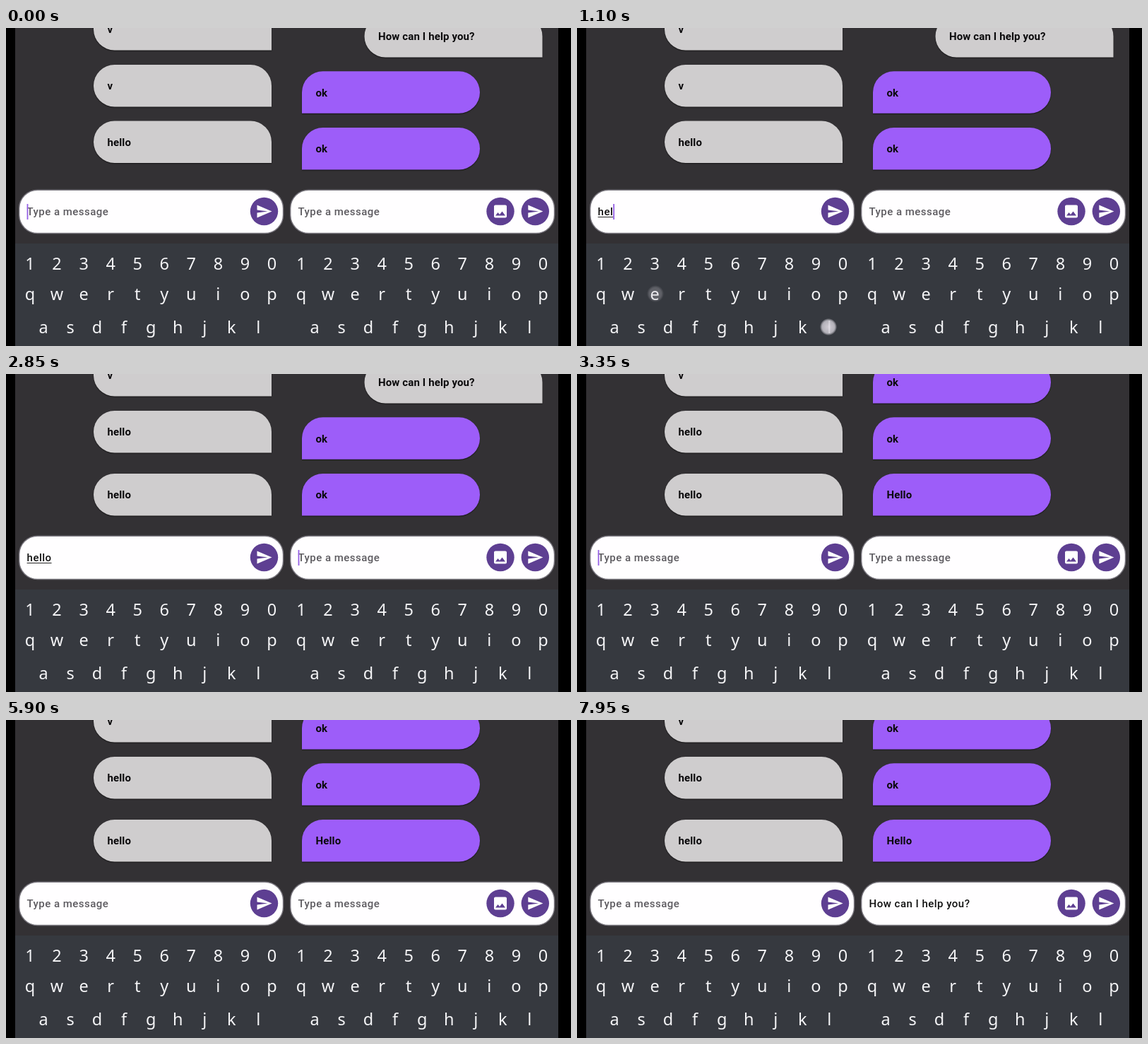
Write an HTML page with a canvas that moves like this. It is 800 by 450 pixels and loops after 8000 ms.

```html
<!DOCTYPE html>
<html lang="en">
<head>
<meta charset="utf-8">
<title>Two-phone chat</title>
<style>
  html, body { margin: 0; width: 100%; height: 100%; overflow: hidden; background: #000; }
  canvas { display: block; width: 800px; height: 450px; }
</style>
</head>
<body>
<canvas id="stage" width="800" height="450"></canvas>
<script>
const ctx = document.getElementById('stage').getContext('2d');
const LOOP = 8000, PHONE_GAP = 384;
const GREY = '#cfcdce', PURPLE = '#9d5df9', BUTTON = '#5e3f92', CURSOR = '#9560e6';
const FIELD_FONT = '500 15px Roboto, sans-serif';
const BUBBLE_FONT = '600 15px Roboto, sans-serif';
const KEY_FONT = '23.5px "Noto Sans", sans-serif';

const SEND_ICON = new Path2D('M2 21L23 12 2 3v7l15 2-15 2z');
const IMAGE_ICON = new Path2D('M21 19V5c0-1.1-.9-2-2-2H5c-1.1 0-2 .9-2 2v14c0 1.1.9 2 2 2h14c1.1 0 2-.9 2-2z' +
  'M8.5 13.5l2.5 3.01L14.5 12l4.5 6H5l3.5-4.5z');

// Each letter is committed when the finger lifts.
const TAPS = [
  { key: 'h', down: 60, up: 200, x: 233, y: 427 },
  { key: 'e', down: 550, up: 800, x: 111, y: 376 },
  { key: 'l', down: 920, up: 1000, x: 356, y: 423 },
  { key: 'l', down: 1100, up: 1200, x: 356, y: 423 },
  { key: 'o', down: 1260, up: 1350, x: 340, y: 377 }
];
const LAST_KEY = 1350, SENT = 2650, CLEARED = 3000, RECEIVED = 3150;
const MENU_OPEN = 6700, PASTED = 7350, TAP_FADE = 500;

function text(string, x, y, font, color, spacing = 0, align = 'left') {
  ctx.font = font;
  ctx.letterSpacing = spacing + 'px';
  ctx.textAlign = align;
  ctx.fillStyle = color;
  ctx.fillText(string, x, y);
  return ctx.measureText(string).width;
}

function roundRect(x, y, w, h, radii) {
  ctx.beginPath();
  ctx.roundRect(x, y, w, h, radii);
}

function bubble(x, y, message, incoming) {
  ctx.save();
  ctx.shadowColor = 'rgba(0,0,0,.6)';
  ctx.shadowOffsetY = 1;
  ctx.shadowBlur = 1.5;
  roundRect(x, y, 252, 59.5, incoming ? [30, 30, 30, 0] : [30, 30, 0, 30]);
  ctx.fillStyle = incoming ? PURPLE : GREY;
  ctx.fill();
  ctx.restore();
  text(message, x + 19.5, y + 35.3, BUBBLE_FONT, '#0b0a0c', 0.12);
}

function button(x, icon) {
  ctx.beginPath();
  ctx.arc(x, 259.5, 19.7, 0, Math.PI * 2);
  ctx.fillStyle = BUTTON;
  ctx.fill();
  ctx.save();
  ctx.translate(x - 12, 247.5);
  ctx.fillStyle = '#fff';
  ctx.fill(icon, 'evenodd');
  ctx.restore();
}

function field(left, value, composing, cursorOn) {
  roundRect(left + 0.7, 229.2, 373.8, 61.3, 26);
  ctx.fillStyle = '#fffeff';
  ctx.fill();
  ctx.strokeStyle = '#79767e';
  ctx.lineWidth = 1.4;
  ctx.stroke();
  const x = left + 11.6;
  const width = text(value || 'Type a message', x, 265, FIELD_FONT, value ? '#111' : '#5d5b60', 0.47);
  if (value && composing) {
    ctx.fillStyle = '#222';
    ctx.fillRect(x, 267, width, 1);
  }
  if (cursorOn) {
    ctx.fillStyle = CURSOR;
    ctx.fillRect(x + (value ? width : 0), 249, 1.8, 22);
  }
}

function keyboard(offset) {
  const row = (keys, x, baseline) => [...keys].forEach((key, i) =>
    text(key, offset + x + i * 38.05, baseline, KEY_FONT, '#f4f4f6', 0, 'center'));
  row('1234567890', 34, 342);
  row('qwertyuiop', 34, 384.5);
  row('asdfghjkl', 53, 432);
}

function tapDot({ down, up, x, y }, t) {
  const alpha = t < down ? 0 : Math.min(1, Math.max(0, 1 - (t - up) / TAP_FADE));
  if (!alpha) return;
  const glow = ctx.createRadialGradient(x, y, 0, x, y, 12);
  glow.addColorStop(0, `rgba(225,220,228,${0.75 * alpha})`);
  glow.addColorStop(0.72, `rgba(205,202,210,${0.65 * alpha})`);
  glow.addColorStop(1, 'rgba(205,202,210,0)');
  ctx.fillStyle = glow;
  ctx.fillRect(x - 12, y - 12, 24, 24);
}

function pasteMenu(alpha) {
  ctx.save();
  ctx.globalAlpha = alpha;
  ctx.shadowColor = 'rgba(0,0,0,.25)';
  ctx.shadowBlur = 2;
  roundRect(404.5, 195.5, 64.5, 43, 6);
  ctx.fillStyle = '#fffeff';
  ctx.fill();
  ctx.shadowColor = 'transparent';
  text('Paste', 418.5, 222, '500 14px Roboto, sans-serif', '#222', 0.1);
  ctx.restore();
}

const blink = (t, start) => (t - start + LOOP) % 1000 < 500;

function draw(t) {
  ctx.fillStyle = '#000';
  ctx.fillRect(0, 0, 800, 450);
  ctx.fillStyle = '#333134';
  ctx.fillRect(13, 0, 769, 450);
  ctx.fillStyle = '#36393f';
  ctx.fillRect(13, 305, 769, 145);

  const sent = t >= SENT;
  bubble(124, -28, 'v', false);
  bubble(124, 52, sent ? 'hello' : 'v', false);
  bubble(124, sent ? 141 : 131.5, 'hello', false);

  if (t < RECEIVED) bubble(507.5, -18, 'How can I help you?', false);
  else bubble(419, -18, 'ok', true);
  bubble(419, 61.3, 'ok', true);
  bubble(419, 141, t < RECEIVED ? 'ok' : 'Hello', true);

  const typed = t < CLEARED ? TAPS.filter(tap => t >= tap.up).map(tap => tap.key).join('') : '';
  const leftCursor = t < LAST_KEY || blink(t, LAST_KEY);
  field(18, typed, true, leftCursor);
  button(365.5, SEND_ICON);

  const pasted = t >= PASTED;
  field(402, pasted ? 'How can I help you?' : '', false, blink(t, pasted ? PASTED : 370));
  button(700, IMAGE_ICON);
  button(749.3, SEND_ICON);

  keyboard(0);
  keyboard(PHONE_GAP);
  TAPS.forEach(tap => tapDot(tap, t));
  if (t >= MENU_OPEN && !pasted) pasteMenu(Math.min(1, (t - MENU_OPEN) / 100));
}

function tick() {
  draw(performance.now() % LOOP);
  requestAnimationFrame(tick);
}
tick();
</script>
</body>
</html>
```
